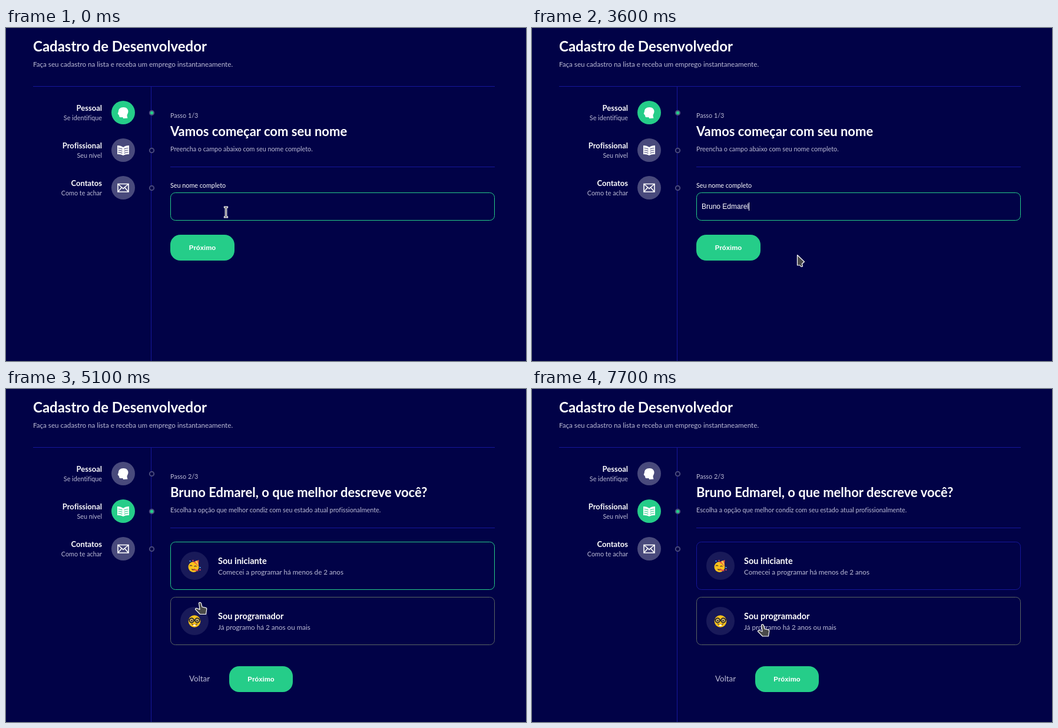
An HTML page that plays this animation: 883 px wide and 567 px high, repeating every 8 s.

```html
<!DOCTYPE html>
<html lang="pt-BR">
<head>
<meta charset="utf-8">
<title>Cadastro de Desenvolvedor</title>
<style>
  html, body { margin: 0; width: 100%; height: 100%; overflow: hidden; background: #010247; }
  svg { display: block; width: 100vw; height: 100vh; }
  text { font-family: Lato, "Open Sans", sans-serif; font-size: 10.8px; font-variant-ligatures: none; fill: #bcbcd6; white-space: pre; }
  .title { font-size: 24px; font-weight: 700; fill: #fff; }
  .heading { font-size: 22px; font-weight: 700; fill: #fff; }
  .name { font-size: 13px; font-weight: 700; fill: #fff; }
  .option { font-size: 14.5px; font-weight: 700; fill: #fff; }
  .note { font-size: 11.65px; }
  .white { fill: #fff; }
  .typed { font: 12px "Liberation Sans", Arial, sans-serif; fill: #fff; }
  .button { font: 700 11.33px "Liberation Sans", Arial, sans-serif; fill: #fff; text-anchor: middle; }
  .back { font-size: 13.4px; }
  .right { text-anchor: end; }
  .line { stroke: #16169a; }
  .box { fill: none; stroke: #25cd89; }
  .accent { fill: #25cd89; }
  .step { color: #494a7c; }
  .step.on { color: #25cd89; }
  .step .dot { fill: #010247; stroke: #494a7c; stroke-width: 2; }
  .step.on .dot { fill: #25cd89; }
  .cursor { fill: #4a4a4a; stroke: #fff; stroke-width: 1.2; stroke-linejoin: round; }
</style>
</head>
<body>
<svg viewBox="0 0 883 567">
  <text class="title" x="46" y="40">Cadastro de Desenvolvedor</text>
  <text class="note" x="46" y="66">Faça seu cadastro na lista e receba um emprego instantaneamente.</text>
  <path class="line" d="M46 99.5H830M246.5 99V567M279 236.5H830"/>

  <g class="step">
    <text class="name right" x="163" y="141">Pessoal</text>
    <text class="right" x="163" y="157">Se identifique</text>
    <circle cx="199" cy="144" r="20" fill="currentColor"/>
    <circle class="dot" cx="247.5" cy="144.5" r="3.7"/>
    <path class="white" d="M199 135C204 134.5 208 138 207.5 143C207 146 205.5 147 205.5 149.5L206.5 153.5L199 154L198.5 152H194.5C192.5 152 192 151 192.2 149L191 147.5L189.7 146L191 142C191 138 194 135 199 135Z"/>
  </g>
  <g class="step">
    <text class="name right" x="163" y="205">Profissional</text>
    <text class="right" x="163" y="221">Seu nível</text>
    <circle cx="199" cy="208" r="20" fill="currentColor"/>
    <circle class="dot" cx="247.5" cy="208.5" r="3.7"/>
    <path class="white" d="M189 200Q195 200 199 203Q203 200 209 200V215Q203 214.5 199 217Q195 214.5 189 215Z"/>
    <path fill="none" stroke="currentColor" stroke-width="1.1" d="M190.5 204.5Q194.5 204.5 197.5 206.3M190.5 208Q194.5 208 197.5 209.8M190.5 211.5Q194.5 211.5 197.5 213.3M207.5 204.5Q203.5 204.5 200.5 206.3M207.5 208Q203.5 208 200.5 209.8M207.5 211.5Q203.5 211.5 200.5 213.3"/>
  </g>
  <g class="step">
    <text class="name right" x="163" y="269">Contatos</text>
    <text class="right" x="163" y="285">Como te achar</text>
    <circle cx="199" cy="272" r="20" fill="currentColor"/>
    <circle class="dot" cx="247.5" cy="272.5" r="3.7"/>
    <path fill="none" stroke="#fff" stroke-width="1.6" d="M190 265.5H208V279H190ZM190 265.5L199 273.5L208 265.5M190 279L196.5 271.5M208 279L201.5 271.5"/>
  </g>

  <g id="personal">
    <text x="279" y="153">Passo 1/3</text>
    <text class="heading" x="279" y="184">Vamos começar com seu nome</text>
    <text x="279" y="210">Preencha o campo abaixo com seu nome completo.</text>
    <text class="white" x="279" y="272">Seu nome completo</text>
    <rect class="box" x="279.5" y="280.5" width="550" height="47" rx="8"/>
    <text id="typed" class="typed" x="288" y="308"></text>
    <rect id="caret" class="white" y="297" width="1" height="14"/>
    <rect class="accent" x="279" y="352" width="109" height="44" rx="17"/>
    <text class="button" x="333.5" y="378">Próximo</text>
  </g>

  <g id="professional">
    <text x="279" y="153">Passo 2/3</text>
    <text id="question" class="heading" x="279" y="184"></text>
    <text x="279" y="210">Escolha a opção que melhor condiz com seu estado atual profissionalmente.</text>
    <g>
      <rect class="box card" x="279.5" y="260.5" width="550" height="81" rx="8"/>
      <circle cx="320" cy="301" r="24" fill="#191a59"/>
      <g transform="translate(318.5 303)">
        <circle r="9" fill="#fcc21b"/>
        <path fill="#e8603c" d="M-1 -8L9 -12L8 -1Q4 -6 -1 -8Z"/>
        <path fill="#f7c948" d="M2.5 -9.5L5.5 -10.7L8.3 -5L8.1 -2Z"/>
        <path fill="none" stroke="#5d4037" stroke-width="1.4" d="M-6.5 -1.5Q-4.5 -4 -2.5 -1.5M1 -.5Q3 -3 5 -.5"/>
        <path fill="#5d4037" d="M-4 3Q-1 4.5 3 3Q1 6 -1 6Q-3 6 -4 3Z"/>
        <path fill="none" stroke="#d84a43" stroke-width="2" d="M0 4.5L8 6.5"/>
        <path fill="#42a5f5" d="M-7 -11h2v2h-2zM10 0h2v2h-2z"/>
        <path fill="#e84b5f" d="M-2 -12h2v2h-2zM10 4h2v2h-2z"/>
      </g>
      <text class="option" x="360" y="298">Sou iniciante</text>
      <text class="note" x="360" y="316">Comecei a programar há menos de 2 anos</text>
    </g>
    <g>
      <rect class="box card" x="279.5" y="354.5" width="550" height="81" rx="8"/>
      <circle cx="320" cy="395" r="24" fill="#191a59"/>
      <g transform="translate(320 395.5)">
        <circle r="10.3" fill="#fcc21b"/>
        <g fill="#f8d977" stroke="#2b2b2b" stroke-width="2">
          <circle cx="-4.8" cy="-1.5" r="3.7"/><circle cx="4.8" cy="-1.5" r="3.7"/>
          <path d="M-11 -3H-8.4M-1 -2H1M8.4 -3H11"/>
        </g>
        <circle cx="-4.6" cy="-1.3" r="1.5" fill="#3b2f2f"/><circle cx="4.6" cy="-1.3" r="1.5" fill="#3b2f2f"/>
        <path fill="none" stroke="#5d4037" stroke-width="1.3" d="M-5 4.3Q0 8 5 4.3"/>
        <path fill="#fff" d="M-2 5.6H2V8H-2Z"/>
      </g>
      <text class="option" x="360" y="392">Sou programador</text>
      <text class="note" x="360" y="410">Já programo há 2 anos ou mais</text>
    </g>
    <text class="back" x="311" y="498">Voltar</text>
    <rect class="accent" x="379" y="472" width="108" height="44" rx="17"/>
    <text class="button" x="433" y="498">Próximo</text>
  </g>

  <path id="cursor" class="cursor"/>
</svg>
<script>
const LOOP = 8000, BLINK = 600, FOCUS = 300, CLICK = 5000, NEXT = 5100, CHOOSE = 7700;
const NAME = "Bruno Edmarel";
const GREEN = "#25cd89", HOVER = "#5a6562", BLUE = "#16169a";
const shapes = {
  beam: "M-3 -9.5H-.8L0 -9L.8 -9.5H3V-7.5H1.2V7.5H3V9.5H.8L0 9L-.8 9.5H-3V7.5H-1.2V-7.5H-3Z",
  arrow: "M.5 .5L12.5 12L8.5 15.5L9.5 20L7 20.5L5 18L.5 18Z",
  hand: "M-2 1.7C-2 -.2 1.3 -.2 1.8 1.7L3.5 8L9.5 9.3C11 9.8 11.6 11 11.2 12.5L10 20.5H0L-8 12.3C-8 10.3 -5.5 9.8 -4 11L-.5 12.5Z"
};
// [time, letters typed so far]
const keys = [[FOCUS, 0], [1600, 1], [1800, 2], [1900, 3], [2100, 4], [2300, 5], [2400, 6],
  [2600, 7], [3000, 8], [3200, 9], [3300, 10], [3400, 12], [3600, 13]];
// [time, x, y, shape], held until the next entry
const moves = [
  [0, 373.5, 313.5, "beam"], [100, 371.5, 309.5, "beam"], [200, 370.5, 305.5, "beam"],
  [700, 400, 345, "arrow"], [800, 440, 380, "arrow"], [900, 450, 386, "arrow"],
  [4400, 437, 381, "arrow"], [4500, 395, 373, "arrow"], [4600, 346, 368, "hand"],
  [4700, 328, 365, "hand"], [4800, 329.5, 363, "hand"],
  [6500, 350.5, 335, "hand"], [6600, 364, 325, "hand"], [6700, 373, 323, "hand"],
  [6800, 380, 335, "hand"], [6900, 386, 363, "hand"], [7000, 390, 388, "hand"], [7100, 391.5, 400.5, "hand"]
];

const el = id => document.getElementById(id);
const steps = document.querySelectorAll(".step");
const cards = document.querySelectorAll(".card");
const latest = (list, t) => list.findLast(entry => entry[0] <= t);
const show = (node, visible) => node.style.display = visible ? "" : "none";

el("question").textContent = NAME + ", o que melhor descreve você?";

function draw(t) {
  const page = t < NEXT ? 0 : 1;
  show(el("personal"), page === 0);
  show(el("professional"), page === 1);
  steps.forEach((step, i) => step.classList.toggle("on", i === page));

  const [pressed, count] = latest(keys, t) || [0, 0];
  el("typed").textContent = NAME.slice(0, count);
  const caretOn = t >= FOCUS && t < CLICK && Math.floor((t - pressed) / BLINK) % 2 === 0;
  show(el("caret"), caretOn);
  if (caretOn) el("caret").setAttribute("x", Math.floor(288 + (count ? el("typed").getComputedTextLength() : 0)));

  const [, x, y, shape] = latest(moves, t);
  el("cursor").setAttribute("d", shapes[shape]);
  el("cursor").setAttribute("transform", `translate(${x} ${y})`);

  const selected = t < CHOOSE ? 0 : 1;
  cards.forEach((card, i) => {
    const top = 260 + i * 94;
    const hovered = y >= top && y <= top + 82;
    card.style.stroke = hovered ? HOVER : i === selected ? GREEN : BLUE;
  });
}

function tick() {
  draw(performance.now() % LOOP);
  requestAnimationFrame(tick);
}
tick();
</script>
</body>
</html>
```
